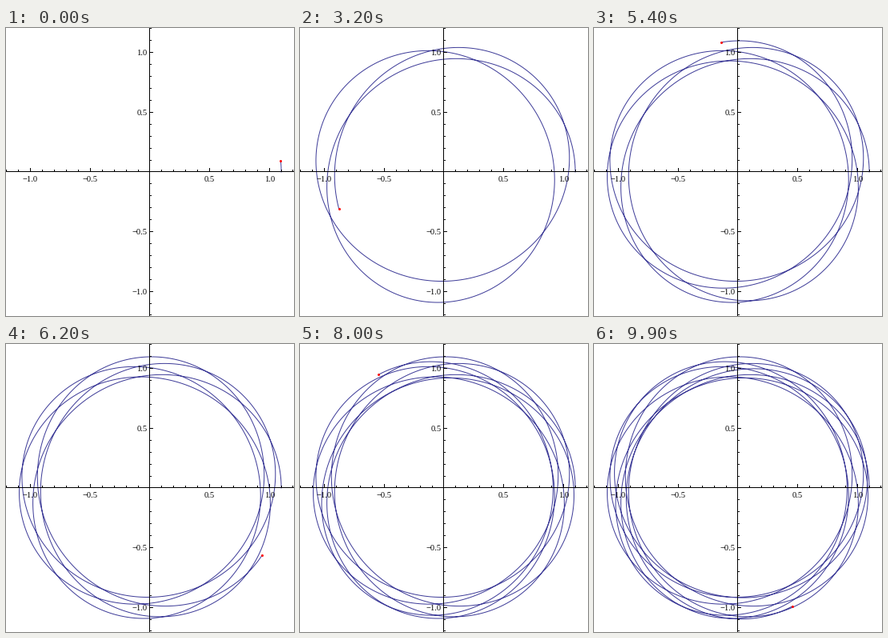
Recreate the animation shown at these times as a matplotlib script. Size 360x360 px, loop 10000 ms.

```python
import numpy as np
import matplotlib.pyplot as plt
from matplotlib.animation import FuncAnimation
from matplotlib.patches import Rectangle

SIZE, DPI = 360, 100
FRAMES, INTERVAL = 100, 100
MID = SIZE / 2
SCALE = 358 / 2.4          # pixels per unit
PT = 72 / DPI              # points per pixel
DT = 0.02
FIRST, PER_FRAME = 5, 25   # integration steps: t = 0.1 + 0.5 k
BLUE = (0.2472, 0.24, 0.6)

plt.rcParams["path.simplify"] = False


def flow(s):
    """Motion under a central force of strength 1/r."""
    pos, vel = s[:2], s[2:]
    return np.concatenate([vel, -pos / (pos @ pos)])


def integrate(s, steps):
    path = [s]
    for _ in range(steps):
        k1 = flow(s)
        k2 = flow(s + DT / 2 * k1)
        k3 = flow(s + DT / 2 * k2)
        k4 = flow(s + DT * k3)
        s = s + DT / 6 * (k1 + 2 * k2 + 2 * k3 + k4)
        path.append(s)
    return np.array(path)


# Unit angular momentum, released at the outer turning point.
orbit = integrate(np.array([1.1, 0, 0, 1 / 1.1]), FIRST + PER_FRAME * (FRAMES - 1))
xs = MID + SCALE * orbit[:, 0]
ys = MID - SCALE * orbit[:, 1]

fig = plt.figure(figsize=(SIZE / DPI, SIZE / DPI), dpi=DPI, facecolor="white")
ax = fig.add_axes([0, 0, 1, 1])
ax.set_xlim(0, SIZE)
ax.set_ylim(SIZE, 0)
ax.axis("off")


def pixel(value):
    """Whole pixel that holds an axis position."""
    return int(np.ceil(MID + SCALE * value - 1e-6)) - 1


def box(x, y, w, h):
    ax.add_patch(Rectangle((x, y), w, h, fc="black", lw=0, antialiased=False, zorder=3))


def label(x, y, value, ha):
    text = f"{value:.1f}".replace("-", "\u2212")
    ax.text(x, y, text, ha=ha, va="baseline", family="Liberation Serif",
            size=10.5 * PT, color="black", zorder=3)


def draw_axes():
    zero = pixel(0)
    box(0, zero, SIZE, 1)
    box(zero, 0, 1, SIZE)
    for n in range(-12, 13):
        if n == 0:
            continue
        value = n / 10
        x, y = pixel(value), pixel(-value)
        major = n % 5 == 0
        length = 4 if major else 2
        box(x, zero - length, 1, length)
        box(zero + 1, y, length, 1)
        if major:
            label(x + 0.5, 192, value, "center")
            label(176.5, y + 4, value, "right")


draw_axes()
curve, = ax.plot([], [], color=BLUE, lw=PT, zorder=2, snap=False)
dot, = ax.plot([], [], "o", color="red", ms=3 * PT, mew=0, zorder=4, snap=False)


def update(k):
    end = FIRST + PER_FRAME * k
    curve.set_data(xs[:end + 1], ys[:end + 1])
    dot.set_data([xs[end]], [ys[end]])
    return curve, dot


anim = FuncAnimation(fig, update, frames=FRAMES, interval=INTERVAL,
                     repeat=True, repeat_delay=0, blit=False)
plt.show()
```
